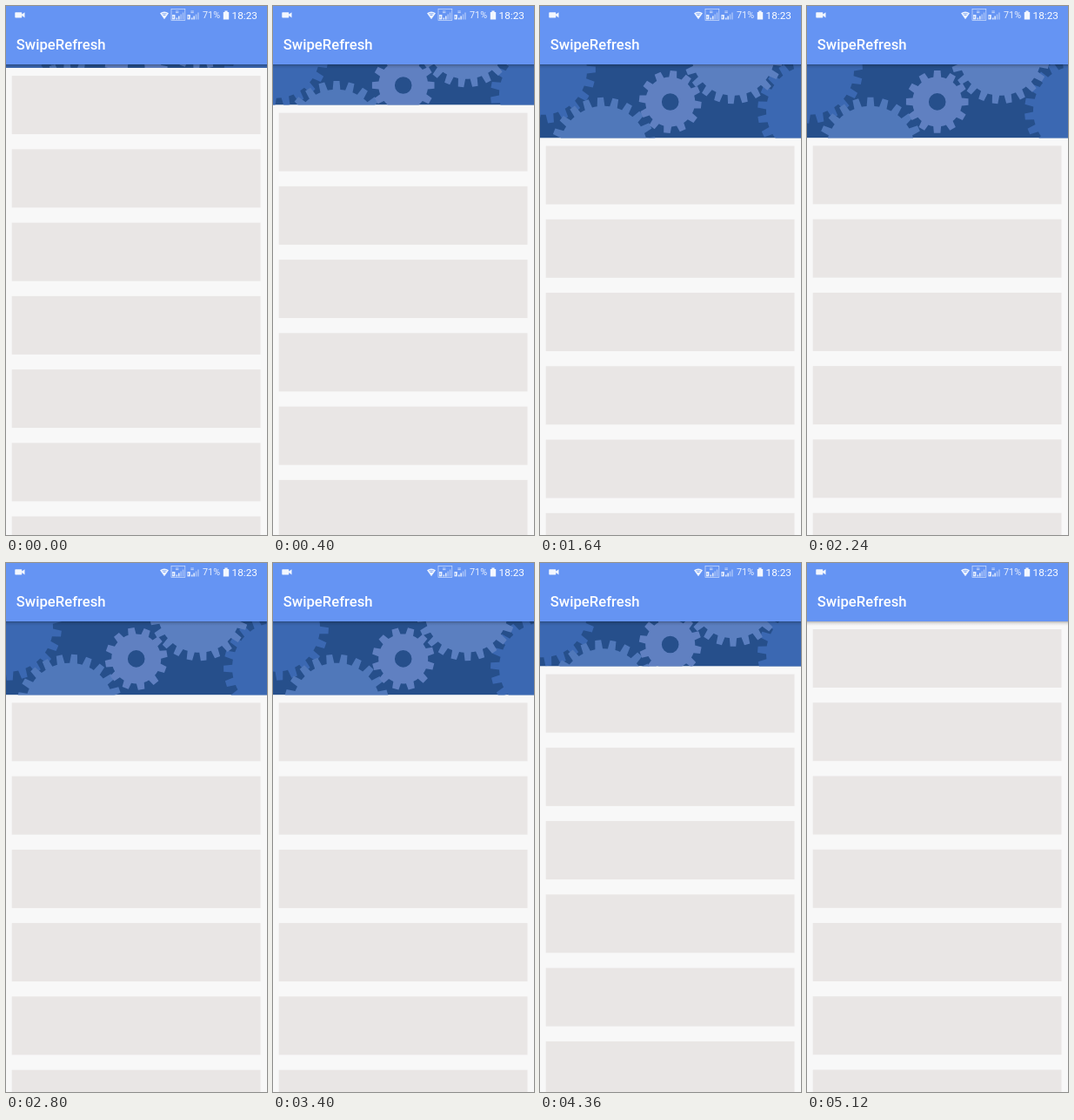
Recreate the animation shown at these times as an HTML page with a canvas. Size 300 px wide and 607 px high, loop 5.16 s.

```html
<!DOCTYPE html>
<html lang="en">
<head>
<meta charset="utf-8">
<title>SwipeRefresh</title>
<style>
  html, body { margin: 0; width: 100%; height: 100%; overflow: hidden; background: #f8f8f8; }
  canvas, svg { position: absolute; left: 0; top: 0; display: block; }
  text { font-family: Roboto, "Noto Sans", sans-serif; fill: #fff; }
</style>
</head>
<body>
<canvas id="stage" width="300" height="607"></canvas>
<svg width="300" height="70" viewBox="0 0 300 70" fill="#fff">
  <path d="M11 7.2h6.6q.7 0 .7.7v1.6l3.2-2.3v6.2l-3.2-2.3v1.6q0 .7-.7.7H11q-.7 0-.7-.7V7.9q0-.7.7-.7z" opacity=".92"/>
  <path d="M177 8.3q5-3.8 10 0l-5 6.9z" opacity=".9"/>
  <path d="M179.4 8.8h5.2M180.6 10.4h2.8" stroke="#6594f3" stroke-width=".8"/>
  <rect x="190" y="3.6" width="15.8" height="13" fill="none" stroke="#fff" stroke-width=".7" opacity=".7"/>
  <g id="bars" opacity=".85">
    <path d="M191 10h3.4v5.4H191z"/>
    <path d="M195.6 13.4h1.5v2h-1.5zM198 11.6h1.5v3.8H198z"/>
    <path d="M200.4 9.6h1.5v5.8h-1.5zM202.8 7.6h1.5v7.8h-1.5z" opacity=".5"/>
    <path d="M195 6h3.4M195 7.6h3.4" stroke="#fff" stroke-width=".7"/>
    <path d="M192.2 11.4v2.6" stroke="#6594f3" stroke-width=".8"/>
  </g>
  <use href="#bars" x="17.4"/>
  <text x="226" y="14.2" font-size="10.8" opacity=".85">71%</text>
  <path d="M251.4 5.6h3.2v1.3h1.6v8.6h-6.4V6.9h1.6z" opacity=".92"/>
  <text x="259.6" y="14.8" font-size="11.8">18:23</text>
  <text x="11.8" y="50.2" font-size="16.67" font-weight="500">SwipeRefresh</text>
</svg>
<script>
const ctx = document.getElementById("stage").getContext("2d");
const W = 300, H = 607, BAR = 67, LOOP = 5160;
const REST = 84.4, RELEASE = 1160, BACK = 4280, SETTLE = 700;
const TAU = Math.PI * 2;

// Finger positions while pulling: [ms, offset]
const drag = [[0, 4], [400, 46.5], [760, 82], [1040, 101], [RELEASE, 103]];

// y is the height below the bar when closed; spin is relative to the middle gear
const gears = [
  { x: 3, y: 31.5, r: 61, root: 51, teeth: 22, spin: 12 / 22, phase: 4, color: "#3b68b2" },
  { x: 312, y: 78, r: 62, root: 52, teeth: 22, spin: -12 / 22, phase: 2, color: "#3b68b2" },
  { x: 222, y: 12.5, r: 57.5, root: 48, teeth: 22, spin: -12 / 22, phase: 6, color: "#5b7fc0" },
  { x: 73, y: 123.5, r: 61, root: 51, teeth: 22, spin: -12 / 22, phase: 0, color: "#5078ba" },
  { x: 149.7, y: 67.7, r: 36, root: 28.5, teeth: 12, spin: 1, phase: 0, hole: 9.8, color: "#6080c1" }
];

const clamp = v => Math.max(0, Math.min(1, v));
const decelerate = p => 1 - Math.pow(1 - clamp(p), 4);

function slope(i) {
  const a = drag[Math.max(0, i - 1)], b = drag[Math.min(drag.length - 1, i + 1)];
  return (b[1] - a[1]) / (b[0] - a[0]);
}

function pull(t) {
  let i = 0;
  while (i < drag.length - 2 && t >= drag[i + 1][0]) i++;
  const [t0, y0] = drag[i], [t1, y1] = drag[i + 1];
  const d = t1 - t0, p = (t - t0) / d, q = 1 - p;
  return y0 * (1 + 2 * p) * q * q + slope(i) * d * p * q * q
       + y1 * (1 + 2 * q) * p * p - slope(i + 1) * d * q * p * p;
}

function offset(t) {
  if (t < RELEASE) return pull(t);
  if (t < BACK) {
    const top = drag[drag.length - 1][1];
    return top + (REST - top) * decelerate((t - RELEASE) / SETTLE);
  }
  return REST * (1 - decelerate((t - BACK) / SETTLE));
}

function angle(t) {
  const refresh = (Math.max(t, RELEASE) - 2240) * 0.09;
  return t < RELEASE ? refresh + (pull(t) - 103) * 2 : refresh;
}

function drawGear(g, y, deg) {
  const step = TAU / g.teeth, turn = (deg * g.spin + g.phase - 90) * TAU / 360;
  const point = (r, a) => ctx.lineTo(g.x + r * Math.cos(a), y + r * Math.sin(a));
  ctx.beginPath();
  for (let i = 0; i < g.teeth; i++) {
    const a = turn + i * step;
    point(g.root, a - step * 0.3);
    point(g.r, a - step * 0.2);
    point(g.r, a + step * 0.2);
    point(g.root, a + step * 0.3);
    ctx.arc(g.x, y, g.root, a + step * 0.3, a + step * 0.7);
  }
  ctx.closePath();
  if (g.hole) {
    ctx.moveTo(g.x + g.hole, y);
    ctx.arc(g.x, y, g.hole, 0, TAU, true);
  }
  ctx.fillStyle = g.color;
  ctx.fill();
}

function rect(color, x, y, w, h) {
  ctx.fillStyle = color;
  ctx.fillRect(x, y, w, h);
}

function draw(t) {
  const h = offset(t), deg = angle(t);
  rect("#f8f8f8", 0, 0, W, H);

  if (h > 0.05) {
    ctx.save();
    ctx.beginPath();
    ctx.rect(0, BAR, W, h);
    ctx.clip();
    rect("#264f8b", 0, BAR, W, h);
    for (const g of gears) drawGear(g, g.y + h / 2, deg);
    ctx.restore();
  }

  for (let y = 76 + h; y < H; y += 84.25) rect("#e9e6e5", 6.7, y, 285.8, 67);

  const shade = ctx.createLinearGradient(0, BAR, 0, BAR + 5);
  shade.addColorStop(0, "rgba(0,0,0,.28)");
  shade.addColorStop(0.4, "rgba(0,0,0,.1)");
  shade.addColorStop(1, "rgba(0,0,0,0)");
  rect(shade, 0, BAR, W, 5);
  rect("#6594f3", 0, 0, W, BAR);
}

const start = performance.now();
function frame() {
  draw((performance.now() - start) % LOOP);
  requestAnimationFrame(frame);
}
frame();
</script>
</body>
</html>
```
